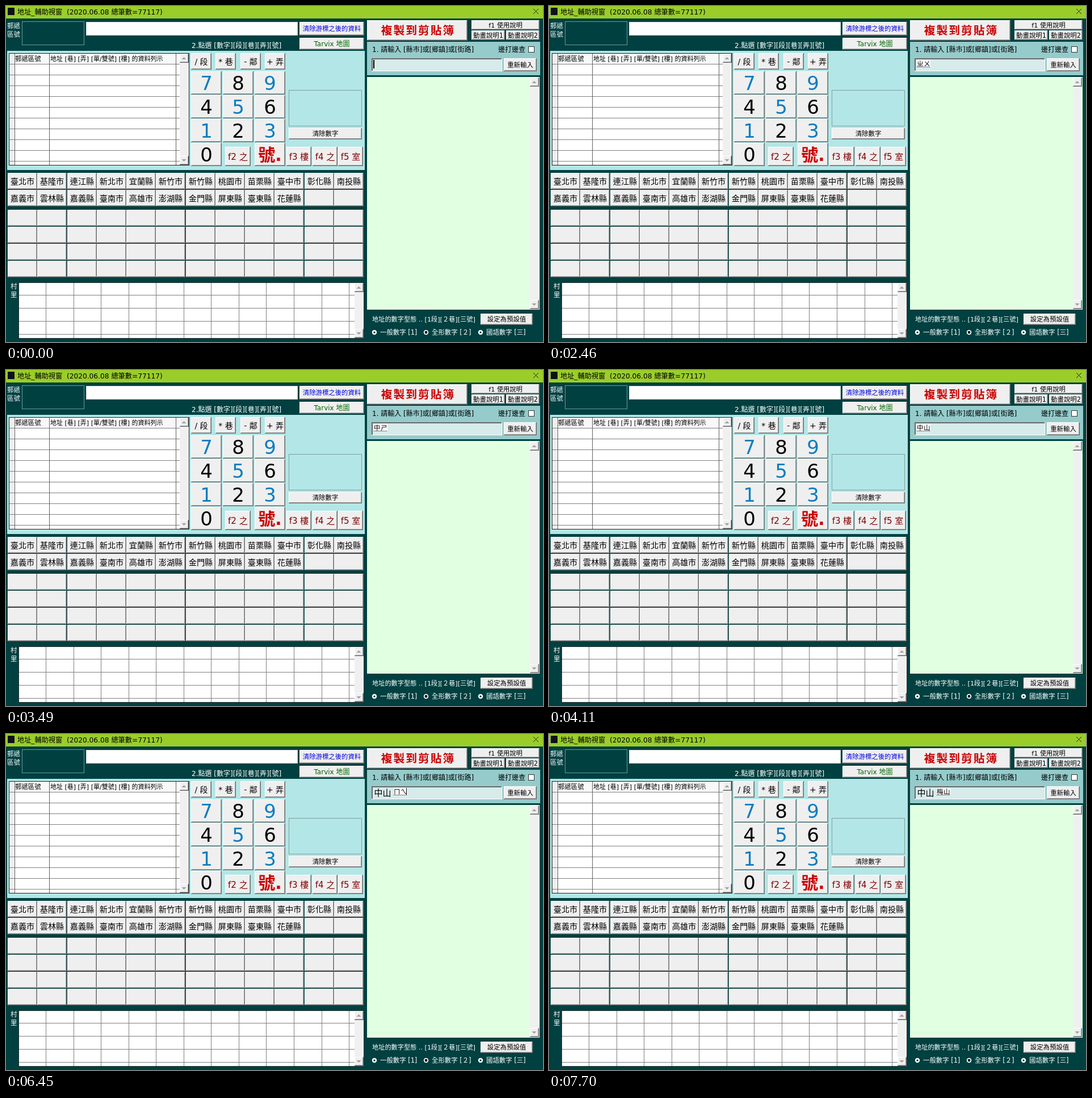
Animation of 946x592 px, one loop 8000 ms. Source, as an HTML page with a canvas:

```html
<!DOCTYPE html>
<html lang="zh-Hant">
<head>
<meta charset="utf-8">
<style>
html, body { margin: 0; height: 100%; overflow: hidden; background: #004040; }
canvas { display: block; }
</style>
</head>
<body>
<canvas id="stage" width="946" height="592"></canvas>
<script>
const ctx = document.getElementById('stage').getContext('2d');
const FONT = '"DejaVu Sans", "Noto Sans CJK TC", "Noto Sans CJK", sans-serif';
const DARK = '#004040', FACE = '#efefef', RED = '#cc0000', MAROON = '#800000', BLUE = '#0a7dc0';
const LOOP = 8000;

function rect(x, y, w, h, color) {
  ctx.fillStyle = color;
  ctx.fillRect(x, y, w, h);
}

function frame(x, y, w, h, color) {
  ctx.strokeStyle = color;
  ctx.lineWidth = 1;
  ctx.strokeRect(x + .5, y + .5, w - 1, h - 1);
}

// cy is the vertical middle of the glyphs
function text(s, x, cy, size, color = '#000', align = 'left', weight = 400) {
  ctx.font = `${weight} ${size}px ${FONT}`;
  ctx.textAlign = align;
  ctx.fillStyle = color;
  ctx.fillText(s, x, cy + size * .37);
}

function button(x, y, w, h, label = '', size = 11.4, color = '#000', weight = 400) {
  rect(x, y, w, h, '#696969');
  rect(x, y, w - 1, h - 1, '#fff');
  rect(x + 1, y + 1, w - 2, h - 2, '#a0a0a0');
  rect(x + 1, y + 1, w - 3, h - 3, FACE);
  if (label) text(label, x + w / 2, y + h / 2, size, color, 'center', weight);
}

function arrow(x, y, dir) {
  ctx.fillStyle = '#a0a0a0';
  ctx.beginPath();
  ctx.moveTo(x - 4, y - 2 * dir);
  ctx.lineTo(x + 4, y - 2 * dir);
  ctx.lineTo(x, y + 2 * dir);
  ctx.fill();
}

function scrollbar(x, y, h) {
  rect(x, y, 16, h, '#f0f0f0');
  for (const [top, dir] of [[y, -1], [y + h - 16, 1]]) {
    button(x, top, 16, 16);
    arrow(x + 7.5, top + 8, dir);
  }
}

function header() {
  rect(0, 0, 946, 22, '#9acd2a');
  rect(3, 3, 12, 13, '#101018');
  text('地址_輔助視窗  (2020.06.08 總筆數=77117)', 20, 10, 12.2);
  ctx.strokeStyle = '#222';
  ctx.lineWidth = 1;
  ctx.beginPath();
  ctx.moveTo(929, 5); ctx.lineTo(938, 14);
  ctx.moveTo(938, 5); ctx.lineTo(929, 14);
  ctx.stroke();

  text('郵遞', 2, 35, 11.4, '#fff');
  text('區號', 2, 50, 11.4, '#fff');
  frame(28, 27, 110, 42, '#5f9f9f');
  rect(141, 28, 373, 24, '#fff');
  frame(141, 28, 373, 24, '#d8d8d8');
  button(517, 28, 114, 24, '清除游標之後的資料', 11.4, '#0000e0');
  button(517, 56, 114, 21, 'Tarvix 地圖', 12, '#006400');
  text('2.點選 [數字][段][巷][弄][號]', 327, 70, 12, '#fff');
}

function resultList() {
  rect(5, 83, 318, 198, '#fff');
  rect(5, 84, 10, 196, FACE);
  rect(15, 84, 291, 18, '#f8f8f8');
  for (let y = 102; y < 280; y += 19) rect(5, y, 301, 1, '#808080');
  for (const x of [15, 76, 299]) rect(x, 84, 1, 196, '#606060');
  scrollbar(306, 84, 196);
  frame(5, 83, 318, 198, '#202020');
  text('郵遞區號', 16, 93, 11.4);
  text('地址 [巷] [弄] [單/雙號] [樓] 的資料列示', 78, 93, 11);
}

function keypad() {
  ['/ 段', '* 巷', '- 鄰', '+ 弄'].forEach((s, i) =>
    button(Math.round(326 + i * 43.4), 83, 36, 29, s, 14));
  [...'7894561230'].forEach((d, i) =>
    button(326 + i % 3 * 56, 115 + Math.floor(i / 3) * 42, 54, 41, d, 34,
      '7951 3'.includes(d) ? BLUE : '#000'));
  button(386, 248, 45, 34, 'f2 之', 15.2, MAROON);
  button(438, 241, 54, 41, '號.', 30, RED, 700);
  ['f3 樓', 'f4 之', 'f5 室'].forEach((s, i) =>
    button(494 + Math.round(i * 45.5), 248, 44, 34, s, 15, MAROON));
  frame(498, 148, 129, 64, '#7f9f9f');
  button(498, 215, 129, 20, '清除數字');
}

function cityGrid() {
  const cities = ('臺北市 基隆市 連江縣 新北市 宜蘭縣 新竹市 新竹縣 桃園市 苗栗縣 臺中市 彰化縣 南投縣 ' +
    '嘉義市 雲林縣 嘉義縣 臺南市 高雄市 澎湖縣 金門縣 屏東縣 臺東縣 花蓮縣').split(' ');
  for (let i = 0; i < 72; i++) {
    const row = Math.floor(i / 12);
    const x = Math.round(3 + i % 12 * 52.27);
    button(x, 294 + row * 30 + (row > 1 ? 5 : 0), 52, 29, cities[i], 14.2);
  }
}

function villageGrid() {
  text('村', 8, 494, 11.4, '#fff');
  text('里', 8, 509, 11.4, '#fff');
  rect(22, 487, 609, 99, '#fff');
  for (let y = 509; y < 586; y += 23) rect(22, y, 592, 1, '#808080');
  for (let i = 0; i < 12; i++) rect(Math.round(70 + i * 48.55), 488, 1, 97, '#808080');
  scrollbar(614, 488, 97);
  frame(22, 487, 609, 99, '#303030');
}

function radio(x, label, on) {
  ctx.fillStyle = '#fff';
  ctx.beginPath();
  ctx.arc(x, 575, 4.2, 0, 7);
  ctx.fill();
  ctx.fillStyle = '#000';
  ctx.beginPath();
  ctx.arc(x, 575, on ? 2.4 : 1.6, 0, 7);
  ctx.fill();
  text(label, x + 10, 575, 11.4, '#fff');
}

function rightSide() {
  button(636, 25, 177, 36);
  ctx.letterSpacing = '2px';
  text('複製到剪貼簿', 726, 43, 19.8, RED, 'center', 700);
  ctx.letterSpacing = '0px';
  button(820, 25, 120, 17, 'f1 使用說明', 11.2);
  button(820, 43, 59, 17, '動畫說明1');
  button(881, 43, 59, 17, '動畫說明2');

  rect(636, 63, 305, 59, '#95cbcb');
  text('1. 請輸入 [縣市]或[鄉鎮]或[街路]', 645, 77, 12);
  text('邊打邊查', 867, 77, 12);
  rect(920, 71, 11, 11, '#fff');
  frame(920, 71, 11, 11, '#333');
  button(877, 92, 58, 23, '重新輸入');

  rect(636, 125, 304, 410, '#e1ffe1');
  scrollbar(923, 126, 408);

  text('地址的數字型態 .. [1段][２巷][三號]', 645, 552, 11.2, '#fff');
  button(836, 542, 92, 20, '設定為預設值');
  radio(649, '一般數字 [1]');
  radio(740, '全形數字 [２]', true);
  radio(836, '國語數字 [三]');
}

// [start, committed text, composing text, caret shown]
const typing = [
  [0, '', '', 1], [450, '', '', 0], [1000, '', '', 1], [1550, '', '', 0], [1690, '', '', 1],
  [2320, '', '', 0], [2390, '', 'ㄓ', 0], [2460, '', 'ㄓㄨ', 0],
  [3010, '', 'ㄓㄨㄥ', 0], [3090, '', '中', 0], [3490, '', '中ㄕ', 0],
  [3950, '', '中ㄕㄢ', 0], [4110, '', '中山', 0],
  [4510, '中山', '', 0], [4890, '中山', '', 1], [5440, '中山', '', 0],
  [5980, '中山', 'ㄇ', 0], [6140, '中山', 'ㄇㄟ', 0], [6450, '中山', 'ㄇㄟ', 1],
  [6770, '中山', 'ㄇㄟ', 0], [7000, '中山', '沒', 0], [7380, '中山', '沒ㄕ', 0],
  [7550, '中山', '沒ㄕㄢ', 0], [7700, '中山', '梅山', 0]
];

function input(t) {
  const [, done, composing, caret] = typing.findLast(step => step[0] <= t);
  rect(644, 92, 230, 23, '#fff');
  rect(644, 92, 229, 22, '#696969');
  rect(646, 94, 227, 20, '#d7ebeb');
  text(done, 648.5, 103, 15, '#000', 'left', 500);
  const left = done ? 683 : 648;
  const end = left + composing.length * 12;
  if (composing) {
    rect(left, 95, end - left, 13, '#fff');
    [...composing].forEach((c, i) => text(c, left + i * 12, 101.5, 11.6));
    for (let x = left; x < end - 1; x += 2) rect(x, 107, 1, 1, '#000');
  }
  if (caret) {
    if (composing) rect(end - 2, 95, 1, 13, '#000');
    else rect(done ? 682 : 647, 95, 2, 15, '#000');
  }
}

function draw() {
  rect(0, 0, 946, 592, DARK);
  header();
  rect(2, 79, 630, 210, '#b3e6e6');
  resultList();
  keypad();
  cityGrid();
  villageGrid();
  rightSide();
  input(performance.now() % LOOP);
  requestAnimationFrame(draw);
}
draw();
</script>
</body>
</html>
```
